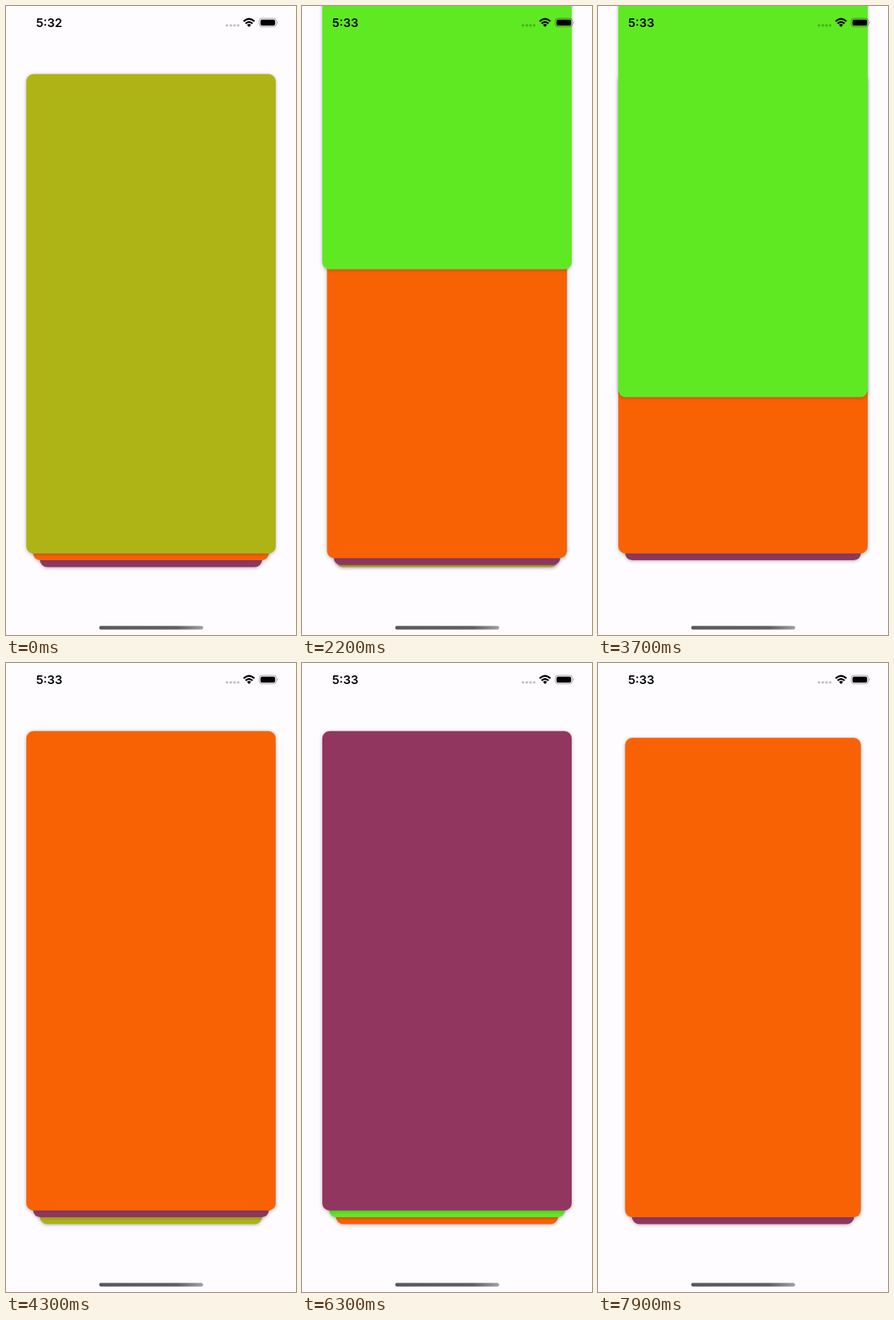
Recreate the animation shown at these times as an HTML page. Size 400 px wide and 866 px high, loop 8 s.

```html
<!DOCTYPE html>
<html lang="en">
<head>
<meta charset="utf-8">
<title>Card stack</title>
<style>
  html, body { margin: 0; width: 100%; height: 100%; overflow: hidden; background: #fefcff; }
  svg { display: block; width: 100vw; height: 100vh; }
  .card { filter: drop-shadow(0 1px 2.5px rgba(70, 70, 85, .42)); }
  #clock { font: 600 16.5px Inter, Roboto, sans-serif; }
</style>
</head>
<body>
<svg viewBox="0 0 400 866">
  <defs>
    <linearGradient id="bar">
      <stop offset="0" stop-color="#5a585b"/>
      <stop offset=".75" stop-color="#626063"/>
      <stop offset="1" stop-color="#a3a1a4"/>
    </linearGradient>
  </defs>
  <rect width="400" height="866" fill="#fefcff"/>
  <g id="cards"></g>
  <text id="clock" x="41.5" y="28.5"></text>
  <g fill="#000" fill-opacity=".25">
    <circle cx="304.8" cy="26.8" r="1.8"/>
    <circle cx="310" cy="26.8" r="1.8"/>
    <circle cx="315.1" cy="26.8" r="1.8"/>
    <circle cx="320.2" cy="26.8" r="1.8"/>
  </g>
  <g fill="none" stroke="#000" stroke-width="2.5">
    <path d="M327.8 21.2Q335.2 14.4 342.6 21.2"/>
    <path d="M330.4 24.2Q335.2 19.8 340 24.2"/>
  </g>
  <path d="M332.4 26Q335.2 23.6 338 26L335.2 28.9Z"/>
  <rect x="349.3" y="17" width="23.6" height="11.6" rx="3.6" fill="none" stroke="#000" stroke-opacity=".38"/>
  <rect x="351" y="18.7" width="20.2" height="8.2" rx="2.2"/>
  <path d="M374 20.8Q375.6 22.8 374 24.8Z" fill-opacity=".4"/>
  <rect x="128.5" y="853.6" width="143.5" height="4.9" rx="2.4" fill="url(#bar)"/>
</svg>
<script>
const LOOP = 8000;
const GREEN = '#5fe923', ORANGE = '#f86204', PURPLE = '#91375f', OLIVE = '#aeb415';
const deck = [PURPLE, GREEN, ORANGE, PURPLE, OLIVE, ORANGE, PURPLE];
const FIRST = 4;        // deck index on top when the loop starts
const AWAY_Y = -866, AWAY_X = 420;
const SWIPE = 163;      // drag distance that fully promotes the next card
const SINK = 210;       // time for the stack to make room for a returning card

const clamp = (v, lo = 0, hi = 1) => Math.min(hi, Math.max(lo, v));
const easeOut = u => 1 - (1 - u) ** 3;
const easeInOut = u => u < .5 ? 4 * u ** 3 : 1 - (2 - 2 * u) ** 3 / 2;

// Slow drag, a pause, then the card is thrown off the top.
function dragAndThrow(ms) {
  const drag = -.2984 * Math.min(ms, 520);
  return drag + (AWAY_Y - drag) * easeInOut(clamp((ms - 700) / 800));
}

const fromTop = (start, end, ease) =>
  ({ start, end, step: -1, y: ms => AWAY_Y * (1 - ease(clamp(ms / (end - start)))) });

const moves = [
  fromTop(580, 1000, easeOut),
  fromTop(1180, 2000, easeInOut),
  fromTop(2080, 2600, easeOut),
  { start: 2780, end: 4280, step: 1, y: dragAndThrow },
  fromTop(4480, 4900, easeOut),
  { start: 5280, end: 6290, step: -1, x: ms => -AWAY_X * (1 - easeInOut(clamp(ms / 1010))) },
  { start: 7080, end: 7880, step: 1, x: ms => AWAY_X * easeInOut(clamp(ms / 800)) }
];

const group = document.getElementById('cards');
const clock = document.getElementById('clock');
const rects = Array.from({ length: 4 }, () => {
  const rect = document.createElementNS('http://www.w3.org/2000/svg', 'rect');
  rect.setAttribute('class', 'card');
  rect.setAttribute('height', 660);
  rect.setAttribute('rx', 10);
  return group.appendChild(rect);
});

// Cards are listed from front to back; rects are painted back to front.
function paint(cards) {
  rects.forEach((rect, i) => {
    const card = cards[rects.length - 1 - i];
    rect.style.display = card ? '' : 'none';
    if (!card) return;
    const { color, slot, dx = 0, dy = 0 } = card;
    rect.setAttribute('x', 28 + 9.4 * slot + dx);
    rect.setAttribute('y', 93.7 + 9.4 * slot + dy);
    rect.setAttribute('width', 344 - 18.8 * slot);
    rect.setAttribute('fill', color);
  });
}

function layout(t) {
  let top = FIRST;
  for (const move of moves) {
    if (t < move.start) break;
    if (t >= move.end) { top += move.step; continue; }
    const ms = t - move.start;
    const dx = move.x ? move.x(ms) : 0;
    const dy = move.y ? move.y(ms) : 0;
    if (move.step < 0) {
      const sink = easeInOut(clamp(ms / SINK));
      const stack = [0, 1, 2].map(i => ({ color: deck[top + i], slot: Math.min(2, i + sink) }));
      return [{ color: deck[top - 1], slot: 0, dx, dy }, ...stack];
    }
    const lift = clamp(Math.hypot(dx, dy) / SWIPE);
    return [0, 1, 2].map(i => i
      ? { color: deck[top + i], slot: i - lift }
      : { color: deck[top], slot: 0, dx, dy });
  }
  const rest = [0, 1, 2].map(i => ({ color: deck[top + i], slot: i }));
  // The next front card is not shown yet right after the last swipe.
  return t >= moves[moves.length - 1].end ? rest.slice(1) : rest;
}

function render(t) {
  clock.textContent = t < 1200 ? '5:32' : '5:33';
  paint(layout(t));
}

function tick() {
  render(performance.now() % LOOP);
  requestAnimationFrame(tick);
}
tick();
</script>
</body>
</html>
```
